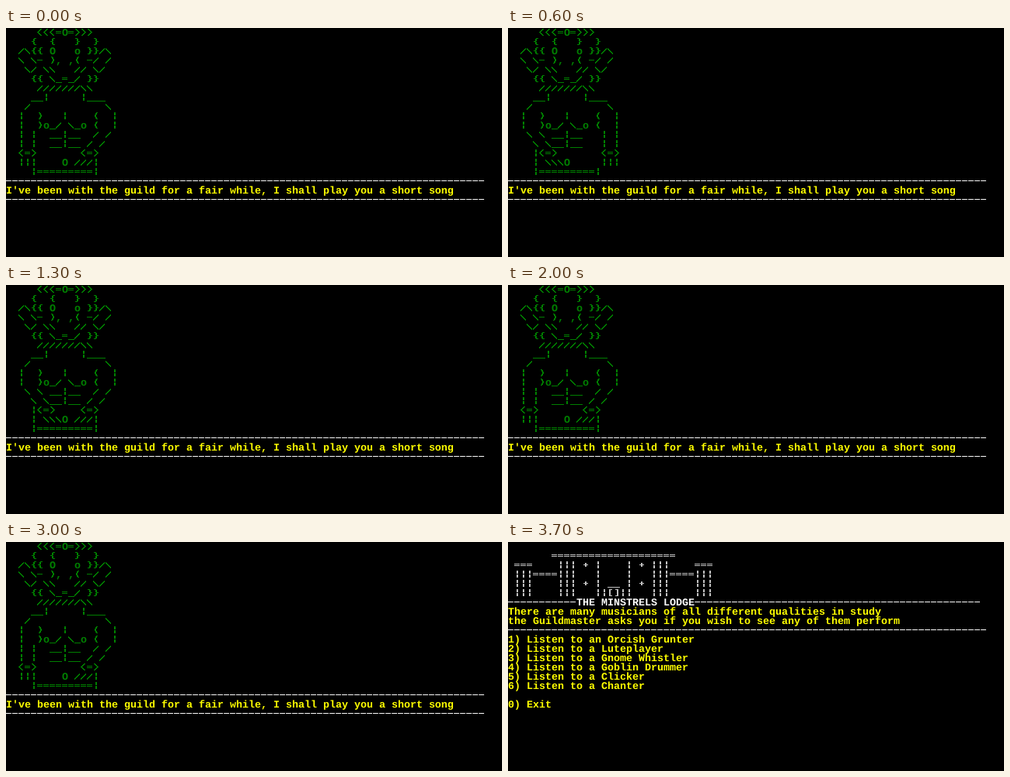
Write an HTML page that moves like this. It is 638 px wide and 296 px high and loops after 3.8 s.

```html
<!DOCTYPE html>
<html lang="en">
<head>
<meta charset="utf-8">
<title>Guild song</title>
<style>
  html, body { margin: 0; width: 100%; height: 100%; overflow: hidden; background: #000; }
  svg { display: block; width: 638px; height: 296px; }
  text { font: bold 13.333px "Liberation Mono", "DejaVu Sans Mono", monospace; text-rendering: geometricPrecision; }
  path { shape-rendering: crispEdges; }
  .art { fill: #008000; }
  .house { fill: #c0c0c0; }
  .rule { fill: #fff; }
  .say { fill: #ff0; }

  #scene, #menu, #scene g[id] { animation: 3800ms step-end infinite; }
  #scene { animation-name: scene; }
  #menu { animation-name: menu; }
  #scene #leftDown { animation-name: left-down; }
  #scene #leftUp { animation-name: left-up; }
  #scene #rightDown { animation-name: right-down; }
  #scene #rightUp { animation-name: right-up; }

  @keyframes scene { 0% { opacity: 1 } 97.3684%, 100% { opacity: 0 } }
  @keyframes menu { 0% { opacity: 0 } 97.3684%, 100% { opacity: 1 } }
  @keyframes left-down {
    0%, 26.3158%, 52.6316%, 78.9474% { opacity: 1 }
    5.2632%, 34.2105%, 60.5263%, 89.4737%, 100% { opacity: 0 }
  }
  @keyframes left-up {
    0%, 26.3158%, 52.6316%, 78.9474% { opacity: 0 }
    5.2632%, 34.2105%, 60.5263%, 89.4737%, 100% { opacity: 1 }
  }
  @keyframes right-down {
    0%, 26.3158% { opacity: 0 }
    15.7895%, 89.4737%, 100% { opacity: 1 }
  }
  @keyframes right-up {
    0%, 26.3158% { opacity: 1 }
    15.7895%, 89.4737%, 100% { opacity: 0 }
  }
</style>
</head>
<body>
<svg viewBox="0 0 638 296">
  <g id="scene">
    <g id="leftDown"></g>
    <g id="leftUp"></g>
    <g id="rightDown"></g>
    <g id="rightUp"></g>
  </g>
  <g id="menu"></g>
</svg>
<script>
const CELL_W = 8, CELL_H = 12, BASELINE = 10;

// Console line glyphs, relative to the top left of their cell.
const GLYPHS = {
  "/": "m6.5 2h.5v1.5l-6.5 6.5h-.5v-1.5z",
  "\\": "m0 2h.5l6.5 6.5v1.5h-.5l-6.5-6.5z",
  "|": "m3 1h2v4h-2zm0 5h2v4h-2z",
  "_": "m0 10h8v1h-8z",
  "-": "m0 5h7v1h-7z",
  "=": "m0 4h7v1h-7zm0 2h7v1h-7z",
  "<": "m4 1h2l-4 4.5 4 4.5h-2l-4-4.5z",
  ">": "m1 1h2l4 4.5-4 4.5h-2l4-4.5z",
  "+": "m3 3h2v2h2v1h-2v2h-2v-2h-2v-1h2z",
  "[": "m2 1h4v1h-2v7h2v1h-4z",
  "]": "m2 1h4v9h-4v-1h2v-7h-2z",
  "{": "m4 1h3v1h-2v3h-1v1h1v3h2v1h-3v-1h-1v-3h-2v-1h2v-3h1z",
  "}": "m1 1h3v1h1v3h2v1h-2v3h-1v1h-3v-1h2v-3h1v-1h-1v-3h-2z",
  "(": "m4 1h2v1h-1v2h-1v3h1v2h1v1h-2v-1h-1v-2h-1v-3h1v-2h1z",
  ")": "m2 1h2v1h1v2h1v3h-1v2h-1v1h-2v-1h1v-2h1v-3h-1v-2h-1z"
};

function add(parent, tag, attrs) {
  const el = document.createElementNS("http://www.w3.org/2000/svg", tag);
  for (const key in attrs) el.setAttribute(key, attrs[key]);
  return parent.appendChild(el);
}

// Prints lines from a row on: line glyphs as shapes, the rest as text.
function print(id, style, row, lines) {
  const group = add(document.getElementById(id), "g", { class: style });
  const shapes = style === "say" ? {} : GLYPHS;
  let d = "";
  lines.replace(/^\n/, "").split("\n").forEach((line, i) => {
    const y = (row + i) * CELL_H;
    let words = "";
    [...line].forEach((ch, col) => {
      if (shapes[ch]) d += `M${col * CELL_W} ${y}${shapes[ch]}`;
      words += shapes[ch] || ch === " " ? "\u00a0" : ch;
    });
    if (words.replace(/\u00a0/g, "")) {
      add(group, "text", { x: 0, y: y + BASELINE }).textContent = words.replace(/\u00a0+$/, "");
    }
  });
  if (d) add(group, "path", { d });
}

const rule = "-".repeat(77);

print("scene", "art", 0, String.raw`
     <<<=O=>>>
    {  {   }  }
  /\{{ O   o }}/\
  \ \- ), ,( -/ /
   \/ \\   // \/
    {{ \_=_/ }}
     ///////\\
    __|     |___
   /            \
  |  )   |    (  |
  |  )o_/ \_o (  |
       __|__
       __|__

         O
    |=========|
`);
print("leftDown", "art", 11, String.raw`
  | |
  | |
  <=>
  |||
`);
print("leftUp", "art", 11, String.raw`
   \ \
    \ \
    |<=>
    | \\\
`);
print("rightUp", "art", 11, String.raw`
              / /
             / /
            <=>
           ///|
`);
print("rightDown", "art", 11, String.raw`
               | |
               | |
               <=>
               |||
`);
print("scene", "rule", 16, `${rule}\n\n${rule}`);
print("scene", "say", 17, "I've been with the guild for a fair while, I shall play you a short song");

print("menu", "house", 1, `
       ====================
 ===    ||| + |    | + |||    ===
 |||====|||   |    |   |||====|||
 |||    ||| + | __ | + |||    |||
 |||    |||   ||[]||   |||    |||
`);
print("menu", "rule", 6, "-".repeat(11) + "THE MINSTRELS LODGE" + "-".repeat(46));
print("menu", "say", 7, `
There are many musicians of all different qualities in study
the Guildmaster asks you if you wish to see any of them perform
`);
print("menu", "rule", 9, rule);
print("menu", "say", 10, `
1) Listen to an Orcish Grunter
2) Listen to a Luteplayer
3) Listen to a Gnome Whistler
4) Listen to a Goblin Drummer
5) Listen to a Clicker
6) Listen to a Chanter

0) Exit
`);
</script>
</body>
</html>
```
